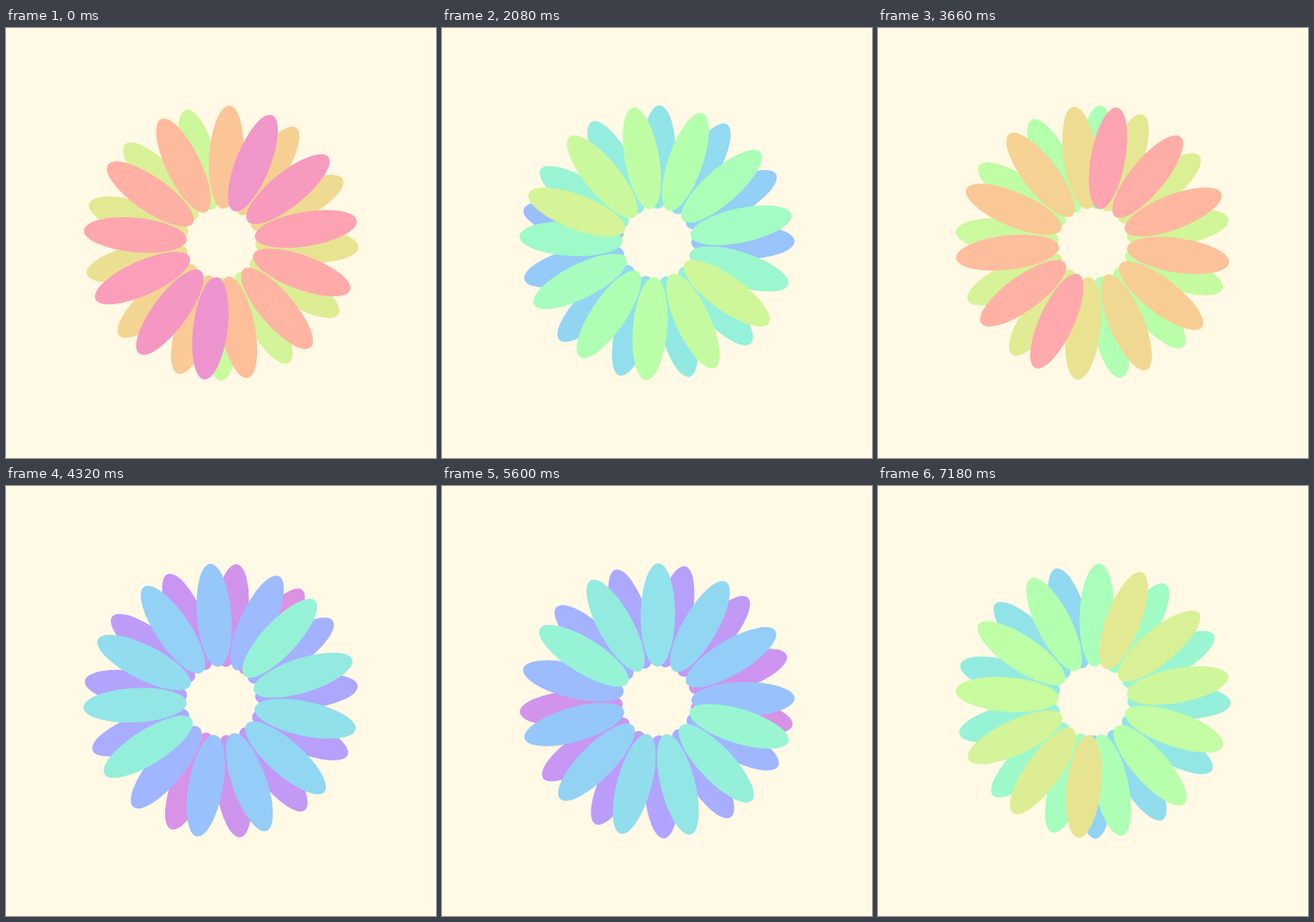
An HTML page with a canvas that plays this animation: 500 px wide and 500 px high, repeating every 7.2 s.

```html
<!DOCTYPE html>
<html lang="en">
<head>
<meta charset="utf-8">
<title>Pastel flower</title>
<style>
  html, body { margin: 0; width: 100%; height: 100%; overflow: hidden; background: #fff9e5; }
  canvas { display: block; width: 500px; height: 500px; }
</style>
</head>
<body>
<canvas id="stage" width="500" height="500"></canvas>
<script>
const ctx = document.getElementById('stage').getContext('2d');
const STEP_MS = 20, STEPS = 360;
const PETALS = 25, TURN = 72; // radians between successive petals

const channel = phase => Math.round(200 + 55 * Math.sin(phase));
const pastel = x => `rgb(${channel(x)}, ${channel(x + 2)}, ${channel(x + 4)})`;

function draw(step) {
  ctx.fillStyle = '#fff9e5';
  ctx.fillRect(0, 0, 500, 500);
  ctx.save();
  ctx.translate(250, 250);
  ctx.rotate(step * Math.PI / 180);
  for (let i = 0; i < PETALS; i++) {
    ctx.fillStyle = pastel((step + i) / 10);
    ctx.beginPath();
    ctx.ellipse(0, 100, 20, 60, 0, 0, 2 * Math.PI);
    ctx.fill();
    ctx.rotate(TURN);
  }
  ctx.restore();
}

const start = performance.now();
function tick() {
  draw(Math.floor((performance.now() - start) / STEP_MS) % STEPS);
  requestAnimationFrame(tick);
}
tick();
</script>
</body>
</html>
```
